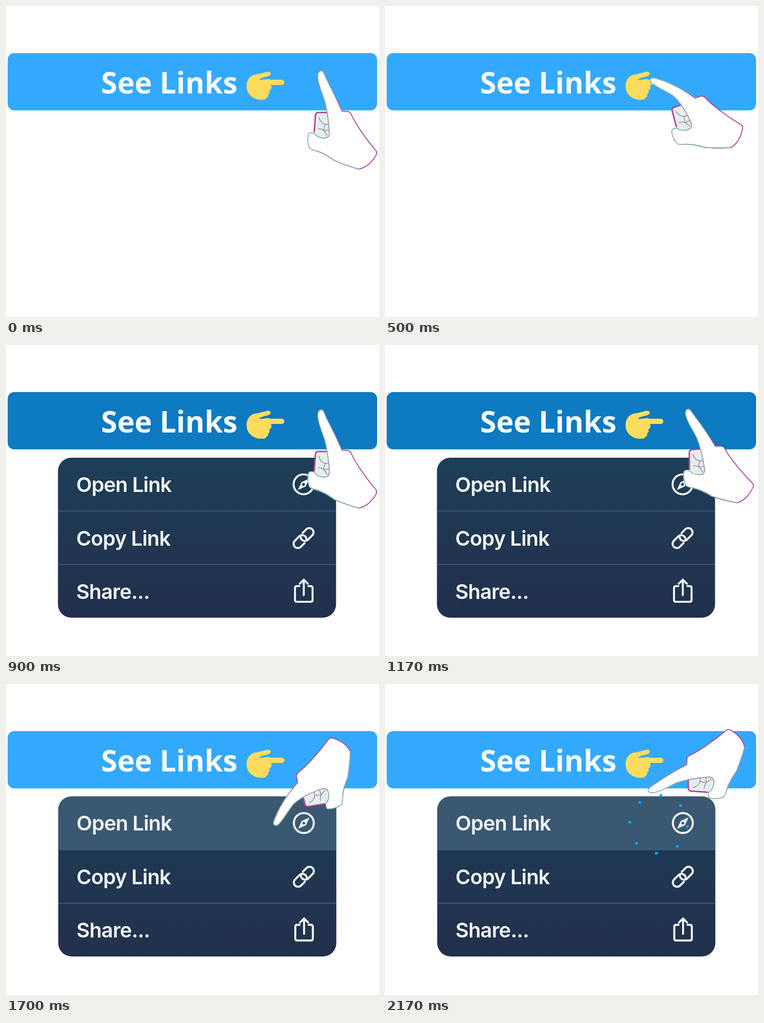
Recreate the animation shown at these times as an HTML page. Size 786x654 px, loop 2210 ms.

```html
<!DOCTYPE html>
<html lang="en">
<head>
<meta charset="utf-8">
<title>See Links</title>
<style>
  html, body { margin: 0; height: 100%; overflow: hidden; background: #fff; }
  svg { display: block; width: 100vw; height: 100vh; }
  .title { font: 700 62px "Open Sans", "Noto Sans", sans-serif; fill: #f6fcff; text-anchor: middle; }
  .item { font: 600 43px Inter, Roboto, sans-serif; letter-spacing: -.9px; fill: #f1f6fa; }
  .icon { fill: none; stroke: #f1f6fa; stroke-width: 4.2; stroke-linecap: round; stroke-linejoin: round; }
  .rays { stroke: #00a9ff; stroke-width: 6; stroke-linecap: round; }
  .line { fill: none; stroke-linecap: round; stroke-linejoin: round; }
</style>
</head>
<body>
<svg viewBox="0 0 786 654">
  <defs>
    <linearGradient id="night" x2="0" y2="1">
      <stop stop-color="#1e3e57"/>
      <stop offset=".45" stop-color="#203752"/>
      <stop offset="1" stop-color="#22304c"/>
    </linearGradient>
    <linearGradient id="edge" gradientUnits="userSpaceOnUse" x1="655" y1="0" x2="718" y2="0">
      <stop stop-color="#86b3a4"/>
      <stop offset=".5" stop-color="#9a8fa8"/>
      <stop offset="1" stop-color="#b0409f"/>
    </linearGradient>
    <clipPath id="card"><rect x="109.5" y="237" width="586" height="336.5" rx="28"/></clipPath>
  </defs>

  <rect id="button" x="3.5" y="99" width="778.5" height="120.5" rx="14"/>
  <text class="title" x="344" y="184">See Links</text>
  <path fill="#ffdc5d" d="M507 171C506 153 517 144 530 143.5L550 138.5Q557 137 558 142Q558 146 550 148.5Q536 151 533 155Q540 156 552 153.5L558 155H581a5.5 5.5 0 0 1 0 11H558q4 8-3 11q2 7-3 9q2 6-4 7q1 4-7 4Q526 198 517 190Q508 183 507 171Z"/>

  <g id="menu">
    <g clip-path="url(#card)">
      <rect x="109" y="236" width="588" height="339" fill="url(#night)"/>
      <rect id="active" x="109" y="236" width="588" height="113" fill="#3b5872"/>
      <path d="M109 349H697M109 461.5H697" stroke="#41687f" stroke-width="1.5"/>
    </g>
    <text class="item" x="148" y="309">Open Link</text>
    <text class="item" x="148" y="421.5">Copy Link</text>
    <text class="item" x="148" y="534">Share...</text>
    <g class="icon">
      <circle cx="627" cy="293" r="21"/>
      <path fill="#f1f6fa" fill-rule="evenodd" stroke="none" d="M639 281L631.5 297.5L615 305L622.5 288.5ZM627 290a3 3 0 1 0 .01 0Z"/>
      <g transform="translate(627 406) rotate(-45)">
        <path id="link" d="M-6 9H-17a9 9 0 0 1 0-18H-4a9 9 0 0 1 7 14.6"/>
        <use href="#link" transform="rotate(180)"/>
      </g>
      <path d="M618 507H613q-4 0-4 4V536q0 4 4 4H642q4 0 4-4V511q0-4-4-4H637M627.5 526V495M619 502l8.5-8.5 8.5 8.5"/>
    </g>
  </g>

  <!-- local origin: the point the palm swings around -->
  <g id="pointer">
    <path id="rays" class="rays"/>
    <g id="hand"><g transform="translate(-601 -365)">
      <path fill="#e3f0ea" d="M677 224H658Q653 224 652 230L649 262Q650 272 658 276Q668 280 676 277Q682 272 681 262Z"/>
      <path class="line" stroke="#b0409f" stroke-width="3" d="M675 224H658Q653 224 652 230L649.5 264"/>
      <path class="line" stroke="#9c7fa6" stroke-width="1.5" d="M659 234Q663 246 670 248T679 249M673 249Q669 255 670 262Q664 258 658 258M670 262L680 261M670 262L677 272"/>
      <path id="skin" fill="#fff" stroke="url(#edge)" stroke-width="1.9" stroke-linejoin="round"/>
      <path class="line" stroke="#8aa9a5" stroke-width="1.9" d="M744 343C728 339 706 331 692 325C680 316 668 309 655 305"/>
    </g></g>
  </g>
</svg>
<script>
const $ = id => document.getElementById(id);
const LOOP = 2210;
const steps = [0, 100, 170, 270, 330, 400, 500, 570, 670, 730, 800, 900, 1000, 1070, 1170,
  1200, 1300, 1370, 1470, 1530, 1600, 1700, 1770, 1870, 1930, 2000, 2100, 2170];

// the hand starts its tap anew in every scene
const upright = "translate(601 365)", turned = "translate(780.3 275.7) rotate(-84.5)";
const scenes = [
  { start: 0, button: "#33a9fd", pose: upright },
  { start: 900, button: "#0d7ac1", pose: upright, menu: true },
  { start: 1200, button: "#33a9fd", pose: turned, menu: true, active: true },
];

// each track is a list of [time within one tap, value]
const swing = [[0, 0], [100, .7], [270, 4.5], [400, 11.5], [500, 19], [570, 23.8],
  [670, 18.3], [800, 11.8], [970, 5.7]];
const rayStart = [[670, 26], [800, 52], [970, 61]];
const rayEnd = [[670, 32], [730, 48], [800, 59], [970, 61]];

const skin = "M657 150C656 142 660 136 665 136C670 137 671 145 677 157C688 178 697 196 708 221" +
  "L721 222Q726 223 729 231C734 243 754 274 780 305Q783 309 779 315C770 330 758 340 744 343" +
  "C728 339 706 331 692 325C680 316 668 309 655 305Q643 302 640 299C635 290 635 275 638 268" +
  "Q641 265 649 267Q655 277 670 278Q681 278 681.5 268C680 240 675 210 670 195C664 178 658 165 657 150Z";

function at(track, t) {
  const i = track.findIndex(k => k[0] >= t);
  if (i < 0) return track[track.length - 1][1];
  if (i === 0) return track[0][1];
  const [t0, a] = track[i - 1], [t1, b] = track[i];
  return a + (b - a) * (t - t0) / (t1 - t0);
}

// curl the finger around its base, more towards the tip
function bend(degrees) {
  const baseX = 694, baseY = 245, length = 109;
  return skin.replace(/([\d.]+) ([\d.]+)/g, (_, px, py) => {
    const x = px - baseX, y = py - baseY;
    const a = degrees * Math.PI / 180 * Math.max(0, -y / length);
    const c = Math.cos(a), s = Math.sin(a);
    return `${baseX + x * c + y * s} ${baseY - x * s + y * c}`;
  });
}

function rayPath(t) {
  if (t < 670 || t > 980) return "";
  const from = at(rayStart, t), to = at(rayEnd, t) + .01;
  let d = "";
  for (let i = 0; i < 8; i++) {
    const a = (i * 45 - 1) * Math.PI / 180;
    const point = r => `${-39 + r * Math.cos(a)} ${-201 + r * Math.sin(a)}`;
    d += `M${point(from)}L${point(to)}`;
  }
  return d;
}

function draw(now) {
  const time = now % LOOP;
  const t = steps.filter(s => s <= time).pop() || 0;
  const scene = scenes.filter(s => s.start <= t).pop();
  const tap = t - scene.start;
  const angle = at(swing, tap);

  $("button").setAttribute("fill", scene.button);
  $("menu").style.display = scene.menu ? "" : "none";
  $("menu").setAttribute("transform", scene.active ? "translate(.6 -.6)" : "");
  $("active").style.display = scene.active ? "" : "none";
  $("pointer").setAttribute("transform", scene.pose);
  $("hand").setAttribute("transform", `rotate(${-angle})`);
  $("skin").setAttribute("d", bend(angle * .95));
  $("rays").setAttribute("d", rayPath(tap));
}

function tick() {
  draw(performance.now());
  requestAnimationFrame(tick);
}
tick();
</script>
</body>
</html>
```
